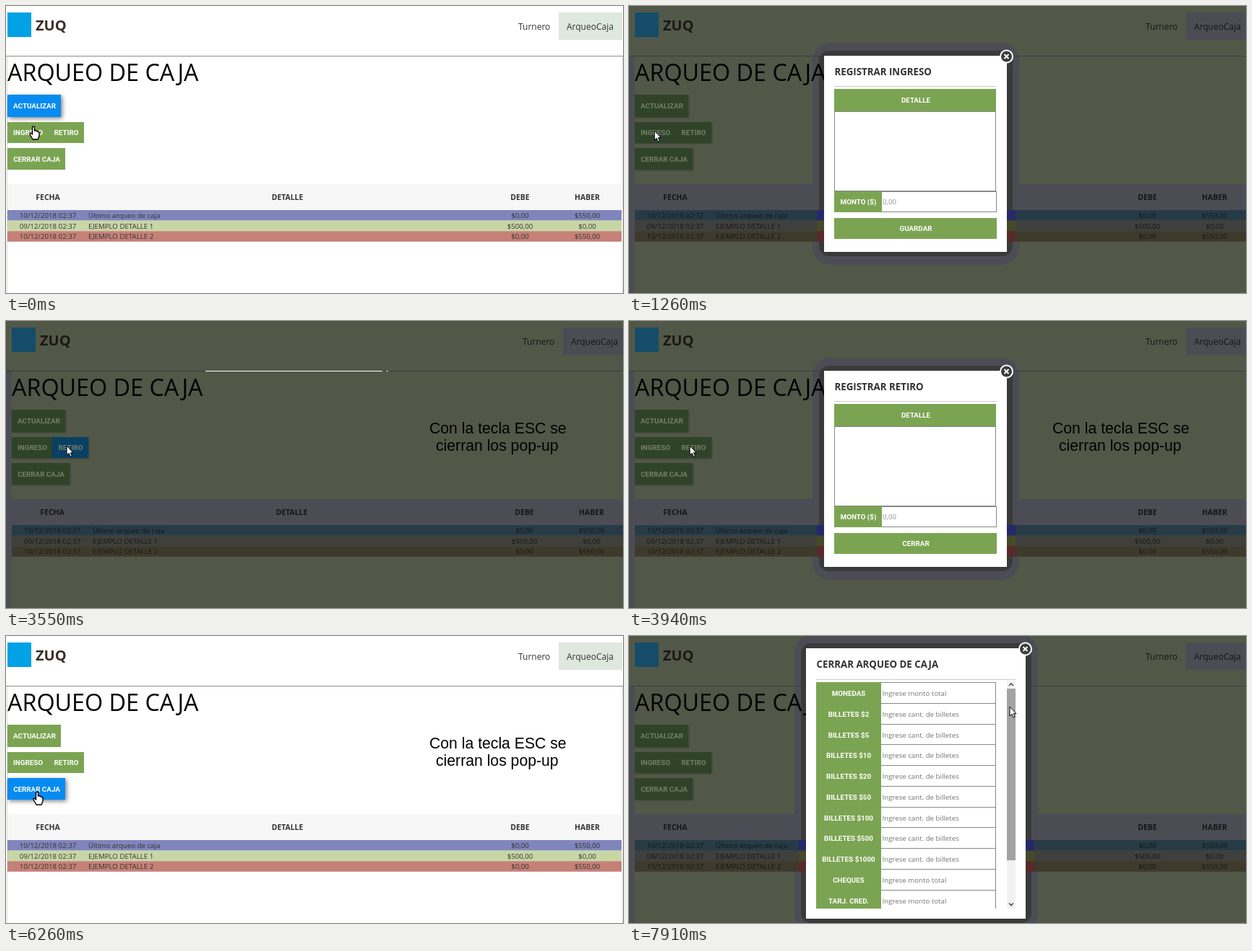
An HTML page with a canvas for the animation above (8000 ms loop, 854 by 398 pixels).

```html
<!DOCTYPE html>
<html lang="es">
<head>
<meta charset="utf-8">
<title>Arqueo de caja</title>
<style>
html, body { margin: 0; width: 100%; height: 100%; overflow: hidden; background: #fff; }
canvas { display: block; }
</style>
</head>
<body>
<canvas id="stage" width="854" height="398"></canvas>
<script>
const g = document.getElementById('stage').getContext('2d');
const LOOP = 8000, SLIDE = 400, SHIFT = 6;
const GREEN = [123, 164, 82], BLUE = [6, 139, 242];
const DIM_GREEN = [47, 67, 41], DIM_BLUE = [9, 64, 100];
const SANS = '"Open Sans", sans-serif', BUTTON_FONT = 'bold 9.8px Roboto, sans-serif';
const SMALL = '9.7px ' + SANS;

const clamp = v => Math.max(0, Math.min(1, v));
const swing = v => 0.5 - Math.cos(clamp(v) * Math.PI) / 2;
const rgb = a => `rgb(${a.map(Math.round)})`;
const mix = (a, b, k) => rgb(a.map((v, i) => v + (b[i] - v) * k));

function box(x, y, w, h, color) {
  g.fillStyle = color;
  g.fillRect(x, y, w, h);
}
function frame(x, y, w, h, color) {
  g.strokeStyle = color;
  g.lineWidth = 1;
  g.strokeRect(x + 0.5, y + 0.5, w - 1, h - 1);
}
function round(x, y, w, h, r, color) {
  g.fillStyle = color;
  g.beginPath();
  g.roundRect(x, y, w, h, r);
  g.fill();
}
function text(s, x, y, font, color, align = 'left') {
  g.font = font;
  g.fillStyle = color;
  g.textAlign = align;
  g.fillText(s, x, y);
}
const label = (s, x, y, color = '#fff') => text(s, x, y + 3.5, BUTTON_FONT, color, 'center');

const popups = [
  { shade: 810, start: 860, close: 2330, x: 270, y: 69, w: 253, h: 272, title: 'REGISTRAR INGRESO', action: 'GUARDAR' },
  { shade: 3540, start: 3540, close: 5330, x: 270, y: 69, w: 253, h: 272, title: 'REGISTRAR RETIRO', action: 'CERRAR' },
  { shade: 6560, start: 6603, close: LOOP, x: 245, y: 17, w: 304, h: 375, title: 'CERRAR ARQUEO DE CAJA' }
];

// each hover: [from, to]
const buttons = [
  { s: 'ACTUALIZAR', x: 2, y: 123, w: 74, h: 31, hovers: [[-400, 0]] },
  { s: 'INGRESO', x: 2, y: 161, w: 56, h: 29, hovers: [[120, 860], [2310, 2980]] },
  { s: 'RETIRO', x: 58, y: 161, w: 50, h: 29, hovers: [[2980, 3560], [5290, 5720]] },
  { s: 'CERRAR CAJA', x: 2, y: 197, w: 80, h: 30, hovers: [[5950, 6950]] }
];

const rows = [
  ['10/12/2018 02:37', 'Último arqueo de caja', '$0,00', '$550,00', '#8085bb', '#263b46', '#25286a'],
  ['09/12/2018 02:37', 'EJEMPLO DETALLE 1', '$500,00', '$0,00', '#c8d6a5', '#3f403d', '#454a28'],
  ['10/12/2018 02:37', 'EJEMPLO DETALLE 2', '$0,00', '$550,00', '#c58178', '#3e3a2b', '#592a2a']
];

const fields = ['MONEDAS', ...[2, 5, 10, 20, 50, 100, 500, 1000].map(n => 'BILLETES $' + n), 'CHEQUES', 'TARJ. CRED.'];

const path = [[0, 38, 167], [500, 35, 173], [2700, 36, 173], [3200, 84, 173],
  [5650, 85, 173], [6150, 43, 216], [7050, 43, 216], [7700, 527, 98], [LOOP, 527, 98]];
const arrow = new Path2D('M0 0V13L3 10.3 5 15 7.2 14 5.2 9.7H9Z');
const hand = new Path2D('M-1.5 1Q0-1 1.5 1V6L3 5.5 5 6.5 7 7.5 8 9V13L6 18H-1L-5 11Q-5 8.5-3 9.5L-1.5 11Z');

function drawButton(b, t, dim) {
  const k = Math.max(...b.hovers.map(([a, z]) => clamp((t - a) / 300) * (1 - clamp((t - z) / 300))));
  const color = dim ? mix(DIM_GREEN, DIM_BLUE, k * k) : mix(GREEN, BLUE, k * k);
  g.save();
  g.shadowColor = `rgba(0,0,0,${dim ? 0.3 : 0.5 * Math.sqrt(k)})`;
  g.shadowOffsetX = g.shadowOffsetY = dim ? 1 : 2;
  g.shadowBlur = dim ? 2 : 6;
  box(b.x, b.y, b.w, b.h, color);
  g.restore();
  if (dim && b.s === 'CERRAR CAJA') box(b.x, b.y, 49, b.h, rgb(DIM_GREEN));
  label(b.s, b.x + b.w / 2 + 0.5, b.y + b.h / 2, dim ? '#757e6c' : '#fff');
}

function drawPage(t, dim, halo) {
  const pick = (light, dark) => dim ? dark : light;
  const violet = '#4c4c55', ink = pick('#333', '#161616');
  box(0, 0, 854, 398, pick('#fff', '#525848'));
  g.save();
  if (dim) g.translate(SHIFT, 0);
  if (dim) box(-SHIFT, 70, 8, 328, violet);
  else for (const x of [1, 853]) box(x, 70, 1, 328, '#ddd');
  box(765, 9, 88, 38, pick('#dfe8df', violet));
  box(2, 247, 850, 36, pick('#f7f7f7', violet));
  if (halo) {
    const x = halo.x - SHIFT;
    round(x - 16, halo.y - 18, halo.w + 33, halo.h + 36, 24, violet);
    round(x - 7, halo.y - 7, halo.w + 15, halo.h + 13, 14, '#3a3a3a');
  }
  box(-SHIFT, 69, 860, 1, pick('#8a8a8a', '#3b3b3f'));

  box(2, 9, 33, 34, pick('#00a2e5', '#144c69'));
  text('ZUQ', 41, 34, 'bold 20px ' + SANS, pick('#3b2d25', '#1d1714'));
  text('Turnero', 709, 33, '12px ' + SANS, ink);
  text('ArqueoCaja', 776, 33, '12px ' + SANS, ink);
  text('ARQUEO DE CAJA', 2, 104, '32.3px ' + SANS, '#000');
  buttons.forEach(b => drawButton(b, t, dim));

  const head = 'bold 10.4px ' + SANS;
  [['FECHA', 58], ['DETALLE', 389.5], ['DEBE', 711.5], ['HABER', 804.5]]
    .forEach(([s, x]) => text(s, x, 269, head, ink, 'center'));
  rows.forEach(([date, detail, debit, credit, light, dark, deep], i) => {
    const y = 283 + i * 14.6, base = 294 + i * 14.6;
    box(2, y, 850, 14.6, pick(light, dark));
    if (halo) box(halo.x - SHIFT - 10, y, halo.w + 22, 14.6, deep);
    text(date, 58, base, SMALL, ink, 'center');
    text(detail, 114, base, SMALL, ink);
    text(debit, 711.5, base, SMALL, ink, 'center');
    text(credit, 804.5, base, SMALL, ink, 'center');
  });
  g.restore();
}

function drawForm(p) {
  const green = rgb(GREEN);
  box(284, 115, 224, 31, green);
  label('DETALLE', 397, 130);
  frame(284, 146, 224, 111, '#888');
  frame(349, 257, 160, 29, '#888');
  box(284, 257, 66, 29, green);
  label('MONTO ($)', 317.5, 271.5);
  text('0,00', 351, 275, SMALL, '#8c949c');
  box(284, 294, 225, 29, green);
  label(p.action, 397, 308.5);
}

function chevron(y, d) {
  g.strokeStyle = '#505050';
  g.lineWidth = 1.6;
  g.beginPath();
  g.moveTo(526, y + d);
  g.lineTo(529, y - d);
  g.lineTo(532, y + d);
  g.stroke();
}

function drawCount(t) {
  const top = i => Math.round(64 + i * 28.75);
  g.save();
  g.beginPath();
  g.rect(259, 62, 277, 316);
  g.clip();
  fields.forEach((s, i) => {
    const y = top(i), h = top(i + 1) - y + 1;
    frame(348, y, 160, h, '#888');
    box(259, y, 90, h, rgb(GREEN));
    label(s, 304, y + 15);
    const hint = s.startsWith('BILLETES') ? 'cant. de billetes' : 'monto total';
    text('Ingrese ' + hint, 350.5, y + 18.5, SMALL, '#757575');
  });
  box(523, 62, 12, 316, '#f1f1f1');
  box(523, 73, 12, 238, t > 7680 ? '#a3a3a3' : '#c9c5c5');
  chevron(67.5, 1.5);
  chevron(372, -1.5);
  g.restore();
}

function drawClose(x, y) {
  g.fillStyle = '#fff';
  g.beginPath();
  g.arc(x, y, 9.5, 0, 7);
  g.fill();
  g.fillStyle = '#3c3c3c';
  g.beginPath();
  g.arc(x, y, 7.5, 0, 7);
  g.fill();
  g.strokeStyle = '#fff';
  g.lineWidth = 2;
  g.beginPath();
  for (const d of [-3, 3]) {
    g.moveTo(x - 3, y - d);
    g.lineTo(x + 3, y + d);
  }
  g.stroke();
}

function drawPopup(p, t) {
  const opening = t < p.start + SLIDE, closing = t >= p.close;
  const part = closing ? 1 - swing((t - p.close) / SLIDE) : swing((t - p.start) / SLIDE);
  g.save();
  if (opening) g.translate(SHIFT, 0);
  if (opening || closing) {
    g.beginPath();
    g.rect(p.x, p.y, p.w, Math.max(1, Math.round(p.h * part)));
    g.clip();
  }
  box(p.x, p.y, p.w, p.h, '#fff');
  text(p.title, p.x + 14.5, p.y + 26.5, 'bold 13.3px ' + SANS, '#333');
  box(p.x + 14, p.y + (p.action ? 42 : 43), p.w - 28, 1, '#ccc');
  if (p.action) drawForm(p);
  else drawCount(t);
  drawClose(p.x + p.w - 0.5, p.y + 1);
  g.restore();
}

function drawCursor(t, dim) {
  const i = path.findIndex(k => k[0] > t);
  const [t0, x0, y0] = path[i - 1], [t1, x1, y1] = path[i];
  const k = swing((t - t0) / (t1 - t0));
  g.save();
  g.translate(x0 + (x1 - x0) * k, y0 + (y1 - y0) * k);
  const shape = dim ? arrow : hand;
  g.lineJoin = 'round';
  g.lineWidth = dim ? 1 : 1.4;
  g.strokeStyle = '#000';
  g.fillStyle = '#fff';
  g.fill(shape);
  g.stroke(shape);
  g.restore();
}

function draw(t) {
  const dim = popups.some(p => t >= p.shade && t < p.close);
  const halo = popups.find(p => t >= p.start + SLIDE && t < p.close);
  drawPage(t, dim, halo);
  const popup = popups.find(p => t >= p.start && t < p.close + SLIDE);
  if (popup) drawPopup(popup, t);
  g.globalAlpha = clamp((t - 1500) / 800) * clamp((7910 - t) / 780);
  const note = '21.2px "Liberation Sans", Arial, sans-serif';
  text('Con la tecla ESC se', 586, 156, note, '#000');
  text('cierran los pop-up', 595, 180, note, '#000');
  g.globalAlpha = 1;
  drawCursor(t, dim);
}

const began = performance.now();
function tick() {
  draw((performance.now() - began) % LOOP);
  requestAnimationFrame(tick);
}
tick();
</script>
</body>
</html>
```
